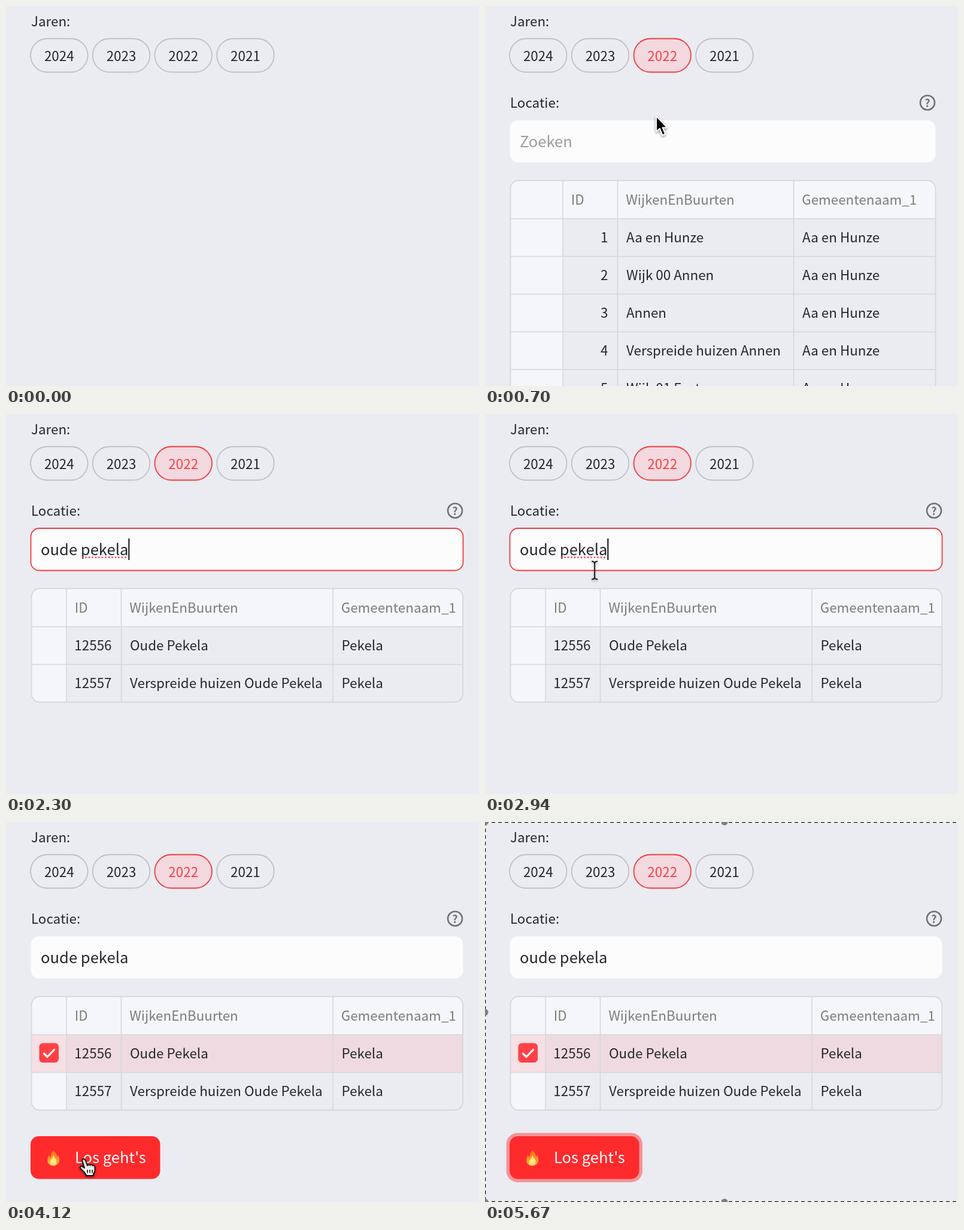
Recreate the animation shown at these times as an HTML page with a canvas. Size 790 by 635 pixels, loop 5790 ms.

```html
<!DOCTYPE html>
<html lang="nl">
<head>
<meta charset="utf-8">
<title>Locatie kiezen</title>
<style>
html, body { margin: 0; width: 100%; height: 100%; overflow: hidden; background: #eaecf1; }
canvas { display: block; }
</style>
</head>
<body>
<canvas id="stage" width="790" height="635"></canvas>
<script>
const g = document.getElementById('stage').getContext('2d');
const LOOP = 5790;
const FONT = '"Noto Sans CJK SC", "Noto Sans CJK JP", "Noto Sans CJK", "Noto Sans", sans-serif';
const INK = '#26272e', GREY = '#7b7c85', LINE = '#d6d7de', RED = '#f03c40', PALE = '#f5f6f9';
const SMALL = 19.2, BODY = 22.4, LARGE = 25.6;

// Moments of the story, in ms
const T = { pick: 610, search: 640, table: 670, focus: 1060, type: 1240, enter: 2150,
  filter: 2210, check: 3300, button: 3390, press: 4760, frame: 5000 };
const QUERY = 'oude pekela', KEY_MS = 73;

// Pointer stops: time, x, y
const enterPath = [[30, 712, 414], [400, 310, 92], [610, 294, 88], [700, 286, 184], [950, 240, 226], [1210, 236, 228]];
const tablePath = [[2730, 236, 228], [2860, 200, 240], [3200, 82, 388], [3300, 80, 391], [3560, 80, 391],
  [3860, 126, 545], [4120, 130, 563], [5330, 130, 563], [5430, 380, 460], [5620, 810, 640]];

function pointerAt(t) {
  const path = [enterPath, tablePath].find(p => t >= p[0][0] && t < p[p.length - 1][0]);
  if (!path) return null;
  const i = path.findIndex(p => p[0] > t);
  const [t0, x0, y0] = path[i - 1], [t1, x1, y1] = path[i];
  let k = (t - t0) / (t1 - t0);
  k = k * k * (3 - 2 * k);
  return { x: x0 + (x1 - x0) * k, y: y0 + (y1 - y0) * k };
}

function text(s, x, y, { size = BODY, color = INK, align = 'left', weight = 400 } = {}) {
  g.font = `${weight} ${size}px ${FONT}`;
  g.fillStyle = color;
  g.textAlign = align;
  g.fillText(s, x, y);
}

function paint(path, fill, stroke, width = 1.8) {
  if (fill) { g.fillStyle = fill; g.fill(path); }
  if (stroke) { g.strokeStyle = stroke; g.lineWidth = width; g.stroke(path); }
}

function box(x, y, w, h, r, fill, stroke, width) {
  const p = new Path2D();
  p.roundRect(x, y, w, h, r);
  paint(p, fill, stroke, width);
  return p;
}

function rect(x, y, w, h, color) {
  g.fillStyle = color;
  g.fillRect(x, y, w, h);
}

function circle(x, y, r, fill, stroke, width) {
  const p = new Path2D();
  p.arc(x, y, r, 0, 7);
  paint(p, fill, stroke, width);
}

function shape(d, x, y, fill, stroke, width) {
  g.save();
  g.translate(x, y);
  paint(new Path2D(d), fill, stroke, width);
  g.restore();
}

function shadow(color, blur, dy) {
  g.shadowColor = color;
  g.shadowBlur = blur;
  g.shadowOffsetY = dy;
}

function years(t) {
  text('Jaren:', 42, 34);
  [2024, 2023, 2022, 2021].forEach((year, i) => {
    const x = 41 + i * 103.7, on = year === 2022 && t >= T.pick;
    box(x, 54.5, 95.6, 56, 28, on ? '#f3d9df' : null, on ? RED : '#bfc1c7');
    text(year, x + 47.8, 91.5, { align: 'center', color: on ? '#fa3f44' : INK });
  });
}

function search(t, right) {
  text('Locatie:', 42, 170);
  circle(right - 14, 161.5, 12, null, '#707178', 2.6);
  text('?', right - 14, 168.5, { size: 18, align: 'center', weight: 700, color: '#707178' });

  const focused = t >= T.focus && t < T.check;
  const typed = QUERY.slice(0, t < T.type ? 0 : Math.floor((t - T.type) / KEY_MS) + 1);
  box(41.5, 191, right - 42, 70.5, 14, '#fcfcfd', focused ? RED : null);
  if (typed) text(typed, 58, 236, { size: LARGE });
  else text('Zoeken', 58, 236, { size: LARGE, color: '#9c9ca1' });
  if (!focused) return;
  g.font = `400 ${LARGE}px ${FONT}`;
  const end = 58 + g.measureText(typed).width;
  rect(end, 208, 2, 36, '#111');
  if (typed && t < T.enter)
    text('Press Enter to apply', right - 12, 252, { size: SMALL, align: 'right', color: '#818187' });
  if (t >= T.enter)
    for (let x = 128; x < end; x += 5.5) circle(x, 239.5, 1.5, '#f0555a');
}

const allRows = [[1, 'Aa en Hunze'], [2, 'Wijk 00 Annen'], [3, 'Annen'],
  [4, 'Verspreide huizen Annen'], [5, 'Wijk 01 Eext']].map(r => [...r, 'Aa en Hunze']);
const foundRows = [[12556, 'Oude Pekela', 'Pekela'], [12557, 'Verspreide huizen Oude Pekela', 'Pekela']];

function table(rows, cols, right, checked, hover) {
  const top = 291.5, head = 64, rowH = 63, bottom = top + head + rows.length * rowH;
  const width = right - 42.5;
  g.save();
  g.clip(box(42.5, top, width, bottom - top, 14, '#ebecf1'));
  rect(42, top, width + 1, head, PALE);
  rect(42, top, cols[0] - 42, bottom - top, PALE);
  if (checked) {
    rect(42, top + head, width + 1, rowH, hover ? '#f2dde2' : '#eedae0');
    if (!hover) rect(42, top + head, cols[0] - 42, rowH, '#f6e0e4');
  }
  rows.forEach((_, i) => rect(42, top + head + i * rowH - .8, width + 1, 1.6, LINE));
  cols.forEach(x => rect(x - .8, top, 1.6, bottom - top, LINE));
  ['ID', 'WijkenEnBuurten', 'Gemeentenaam_1'].forEach((s, i) =>
    text(s, cols[i] + 13.7, 332, { color: GREY }));
  rows.forEach(([id, area, town], i) => {
    const y = 395 + i * rowH;
    text(id, cols[1] - 16, y, { align: 'right' });
    text(area, cols[1] + 14.5, y);
    text(town, cols[2] + 14.5, y);
  });
  if (checked) {
    box(55.5, 369.5, 32.5, 32.5, 6, '#ff4146');
    shape('M0 0L6.5 6.5L19 -6.5', 62.5, 386, null, '#fff', 3.2);
  } else if (hover) {
    box(56.5, 370.5, 30.5, 30.5, 6, null, '#bfc1c7', 2);
  }
  if (hover) box(44, 470, 670, 11, 5.5, '#95969a');
  g.restore();
  box(42.5, top, width, bottom - top, 14, null, LINE);
}

function toolbar() {
  g.save();
  shadow('#0002', 12, 3);
  box(527, 236, 237, 47, 11, '#f4f5f8');
  g.restore();
  const icon = (d, x) => shape(d, x, 259.5, null, '#73747c', 2.2);
  icon('M-7 -7L7 7M7 -7L-7 7', 551);
  icon('M-11 0Q0 -15 11 0Q0 15 -11 0Z', 598.5);
  circle(598.5, 259.5, 3.8, null, '#73747c', 2.2);
  icon('M0 -9V3M-5 -2L0 3.5L5 -2M-8 3V8H8V3', 646);
  icon('M2.5 2.5L9 9M3.5 -2.5A5.8 5.8 0 1 1 -8.1 -2.5A5.8 5.8 0 1 1 3.5 -2.5', 692);
  icon('M-7 -2.5V-7H-2.5M2.5 -7H7V-2.5M7 2.5V7H2.5M-2.5 7H-7V2.5', 740);
}

function button(active, pressed) {
  if (pressed) box(35.5, 519.5, 227.5, 82.5, 19, '#f5959a');
  box(41, 525, 216.5, 71.5, 14, active ? '#ff2a2c' : '#ff4144');
  const glow = g.createLinearGradient(0, -14, 0, 13);
  glow.addColorStop(0, '#ff6a1c');
  glow.addColorStop(1, '#ffb52e');
  shape('M0 -13Q6 -8 6 -2Q8 -3 8 -6Q12 3 9 8Q6 13 0 13Q-7 13 -9.5 7Q-11 1 -7 -5Q-6 -2 -4.5 -1Q-4 -9 0 -13Z', 79, 561.5, glow);
  shape('M0 -5Q2 0 5 3Q7 12 0 12.5Q-7 12 -5 4Q-1 1 0 -5Z', 79, 561.5, '#ffe483');
  text("Los geht's", 115, 570, { size: LARGE, color: '#fff' });
}

function selectionFrame() {
  const edges = 'M0 .5H790M.5 0V635M0 634.5H790';
  shape(edges, 0, 0, null, '#f8f8f8', 1.4);
  g.setLineDash([6, 5]);
  shape(edges, 0, 0, null, '#111', 1.4);
  g.setLineDash([]);
  [[0, 0], [400, 0], [0, 318], [0, 635], [400, 635]].forEach(([x, y]) => circle(x, y, 5.5, '#7f7f83'));
}

function pointer({ x, y }, hand, beam) {
  g.save();
  g.lineJoin = 'round';
  shadow('#0005', 4, 2);
  if (beam) {
    shape('M-5 -15Q0 -15 0 -11Q0 -15 5 -15M0 -11V11M-5 15Q0 15 0 11Q0 15 5 15', x, y, null, '#222', 2);
  } else if (hand) {
    shape('M-3 2Q-1 -2 2.5 2L6 11Q9 8 10.5 10.5Q13 8.5 14.5 11Q18 10 18.5 13.5V19Q18 23 16 25V28H4Q3 24 -2 19.5Q-7.5 15 -6 13Q-3.5 11 1 15Z',
      x, y, '#fff', '#111', 1.9);
    g.shadowColor = 'transparent';
    shape('M6 18V23.5M10 18V23.5M14 18V23.5', x, y, null, '#111', 1.6);
  } else {
    shape('M0 0V26L5.8 20.7L10.5 32L15.2 30L10.5 19.2H18.5Z', x, y, '#000', '#fff', 2);
  }
  g.restore();
}

function draw(t) {
  rect(0, 0, 790, 635, '#eaecf1');
  const p = pointerAt(t);
  const over = (x, y, w, h) => p && p.x >= x && p.x <= x + w && p.y >= y && p.y <= y + h;
  const filtered = t >= T.filter, checked = t >= T.check;
  const right = t >= T.table && !filtered ? 753 : 764;
  const onTable = filtered && over(42, 291, 722, 191);
  const onButton = t >= T.button && over(41, 525, 217, 72);

  years(t);
  if (t >= T.search) search(t, right);
  if (filtered) table(foundRows, [101, 192.5, 546], 763, checked, onTable);
  else if (t >= T.table) table(allRows, [130, 221.5, 515.5], 752.5, false, false);
  if (onTable) toolbar();
  if (t >= T.button) button(onButton || t >= T.press, t >= T.press);
  if (t >= T.frame) selectionFrame();
  if (p) {
    const hand = over(248, 54, 96, 57) || onButton || (onTable && over(42, 356, 59, 126));
    pointer(p, hand, t >= T.search && over(41, 190, 712, 72));
  }
}

const start = performance.now();
function tick() {
  draw((performance.now() - start) % LOOP);
  requestAnimationFrame(tick);
}
tick();
</script>
</body>
</html>
```
